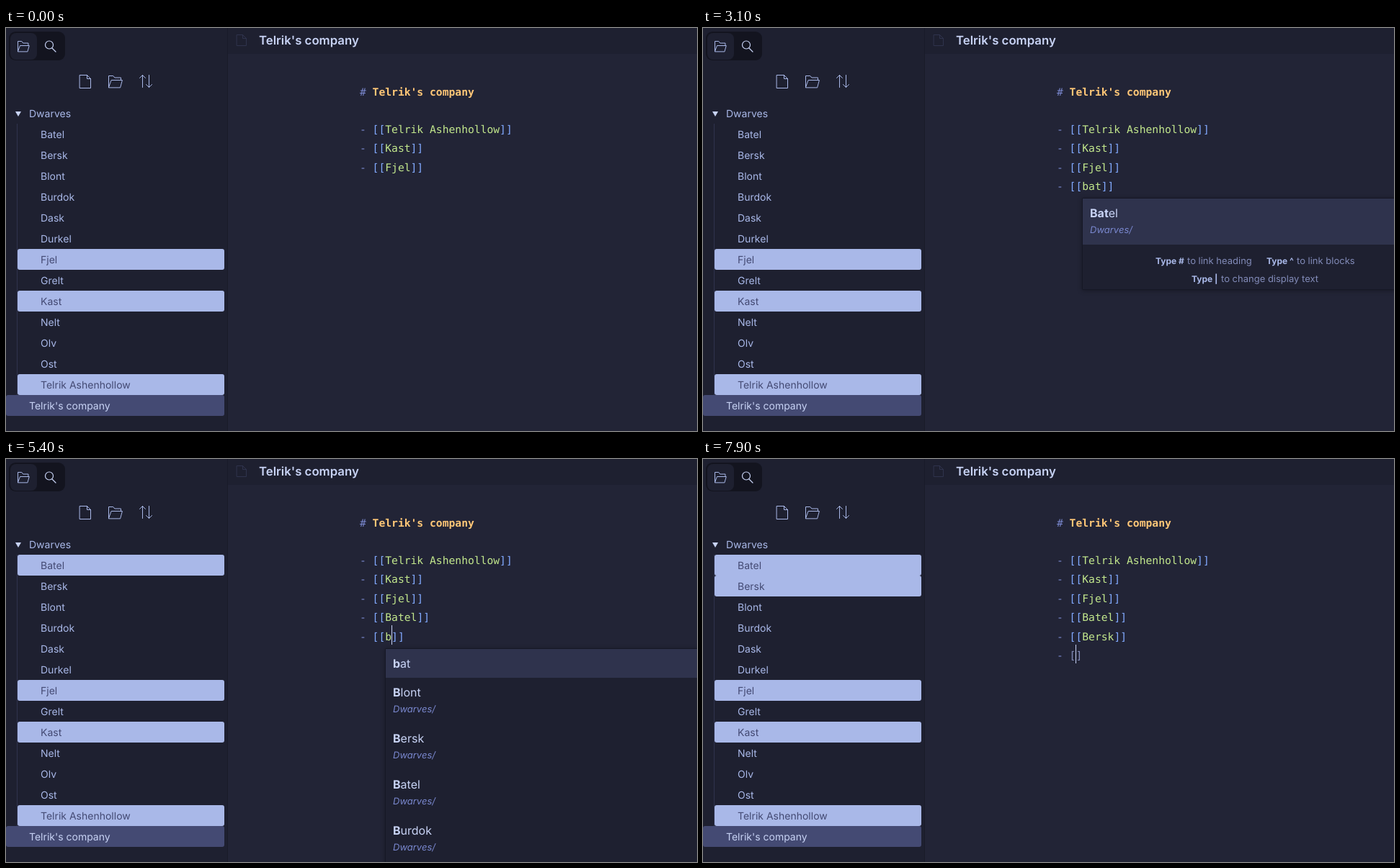
Animation, 959 px wide and 560 px high, one loop 8 s. Source, as an HTML page:

```html
<!DOCTYPE html>
<html lang="en">
<head>
<meta charset="utf-8">
<title>Linking notes</title>
<style>
  html, body { margin: 0; width: 100%; height: 100%; overflow: hidden; background: #222436; }
  svg { display: block; }
  text { white-space: pre; font: 14px Inter, sans-serif; fill: #a9b8e8; text-rendering: geometricPrecision; }
  .title { font-size: 16.8px; font-weight: 600; fill: #c8d3f5; }
  .on { fill: #444a73; }
  .active { fill: #c8d3f5; }
  .code { font: 14.667px "DejaVu Sans Mono", monospace; fill: #828bb8; }
  .mark { fill: #7a88cf; }
  .head { fill: #ffc777; font-weight: 700; }
  .bracket { fill: #82aaff; }
  .link { fill: #c3e88d; }
  .item { font-size: 16px; fill: #c8d3f5; }
  .item .hit { font-weight: 700; }
  .path { font-size: 13px; font-style: italic; fill: #7a88cf; }
  .hint { font-size: 13px; fill: #828bb8; }
  .key { font-size: 12px; font-weight: 700; fill: #a9b8e8; }
  .icon { fill: none; stroke: #a9b8e8; stroke-width: 1; stroke-linejoin: round; stroke-linecap: round; }
  .lens { stroke: #c8d3f5; stroke-width: 1.2; }
  .faint { stroke: #2f334d; }
  .panel { filter: drop-shadow(0 1px 3px #0005); }
</style>
</head>
<body>
<svg id="stage" width="959" height="560" viewBox="0 0 959 560"></svg>
<script>
const LOOP = 8000;
const LEADER = "Telrik Ashenhollow", TITLE = "Telrik's company";
const FOLDER = ["Batel", "Bersk", "Blont", "Burdok", "Dask", "Durkel", "Fjel",
  "Grelt", "Kast", "Nelt", "Olv", "Ost", LEADER];
const LINKS = [LEADER, "Kast", "Fjel", "Batel", "Bersk"];
const RECENT = [TITLE, "Kast", "Fjel", LEADER, "Burdok", "Blont"];
const MATCHES = ["Blont", "Bersk", "Batel", "Burdok"];

// time, list row being edited, its text with | as the caret, popup query
const STEPS = [
  [0, 2, "- [[Fjel]]"], [500, 2, "- [[Fjel]]|"],
  [600, 3, "- |"], [1000, 3, "- [|]"], [1300, 3, "- [[|]]"],
  [1400, 3, "- [[|]]", ""], [1900, 3, "- [[]]", ""],
  [2100, 3, "- [[b|]]", "b"], [2200, 3, "- [[ba|]]", "b"],
  [2300, 3, "- [[ba|]]", "ba"], [2600, 3, "- [[bat|]]", "bat"],
  [3100, 3, "- [[bat]]", "bat"], [3200, 3, "- [[Batel]]|"], [3800, 3, "- [[Batel]]"],
  [4100, 4, "- |"], [4600, 4, "- "], [4700, 4, "- [|]"], [4900, 4, "- [[|]]", ""],
  [5300, 4, "- [[b|]]", "b"], [5700, 4, "- [[be|]]", "b"], [5800, 4, "- [[be|]]", "be"],
  [6200, 4, "- [[be]]", "be"], [6600, 4, "- [[Bersk]]|"], [7100, 4, "- [[Bersk]]"],
  [7400, 5, "- |"], [7900, 5, "- [|]"]
];
const LINKED_AT = { Batel: 5400, Bersk: 7500 };

const X0 = 490.95, CHAR = 8.83, LINE = 26.4;
const lineTop = row => Math.round(125.6 + LINE * row);

const rect = (x, y, w, h, fill, r = 0, cls = "") =>
  `<rect x="${x}" y="${y}" width="${w}" height="${h}" rx="${r}" fill="${fill}" class="${cls}"/>`;
const text = (x, y, cls, s) => `<text x="${x}" y="${y}" class="${cls}">${s}</text>`;
const span = (cls, s) => `<tspan class="${cls}">${s}</tspan>`;
const icon = (d, cls = "") => `<path class="icon ${cls}" d="${d}"/>`;

const page = (x, y, w, h, cls) =>
  icon(`M${x} ${y}h${w - 5}l5 5v${h - 5}h${-w}zM${x + w - 5} ${y}v5h5`, cls);
const folder = (x, y, w, h) =>
  icon(`M${x} ${y + h}V${y}h${w * .35}l2 2.5h${w * .48}v3.5M${x} ${y + h}l${w * .2} ${6 - h}h${w * .85}l${-w * .15} ${h - 6}z`);

function frameArt() {
  return rect(0, 0, 307, 560, "#1e2030") + rect(307, 0, 1, 560, "#191b29") +
    rect(308, 0, 651, 36, "#1e2030") +
    rect(4, 5, 78, 40, "#13141f", 9) + rect(6, 7, 37, 37, "#1e2030", 8) +
    folder(16.5, 18.5, 15, 14) +
    icon("M64 28L69 33M65.5 23.5a5.5 5.5 0 1 1-11 0a5.5 5.5 0 1 1 11 0", "lens") +
    page(102.5, 65.5, 15, 18) + folder(142.5, 66.5, 18, 16) +
    icon("M189.5 82.5v-17l-4 4M189.5 65.5l4 4M198.5 65.5v17l-4-4M198.5 82.5l4-4") +
    page(320.5, 9.5, 13, 15, "faint") +
    text(351, 23, "title", TITLE) +
    '<path d="M13 116h8l-4 7z" fill="#c8d3f5"/>' + text(32, 124, "", "Dwarves");
}

function sidebar(time) {
  const rows = FOLDER.map((name, i) => {
    const y = 133 + 29 * i;
    const on = LINKS.includes(name) && time >= (LINKED_AT[name] || 0);
    return (on ? rect(16, y, 287, 29, "#a9b8e8", 3) : "") + text(48, y + 20, on ? "on" : "", name);
  });
  return rect(15, 133, 1, 377, "#2f334d") + rows.join("") +
    rect(0, 510, 303, 29, "#444a73", 3) + text(32, 530, "active", TITLE);
}

function codeLine(row, line) {
  const s = line.replace("|", "")
    .replace(/\[\[(.*)\]\]/, (_, name) => span("bracket", "[[") + span("link", name) + span("bracket", "]]"))
    .replace(/^-/, span("mark", "-"));
  return text(X0, Math.round(146 + LINE * row), "code", s);
}

function editor(row, line) {
  let out = text(X0, 94, "code", span("mark", "# ") + span("head", TITLE));
  for (let i = 0; i < row; i++) out += codeLine(i, `- [[${LINKS[i]}]]`);
  out += codeLine(row, line);
  const caret = line.indexOf("|"), top = lineTop(row);
  if (caret >= 0) out += rect(Math.floor(X0 + CHAR * caret), top, 1, lineTop(row + 1) - top, "#c8d3f5");
  return out;
}

// Marks the query letters in order; null when the name does not contain them
function fuzzy(name, query) {
  let n = 0;
  const s = [...name].map(c => c.toLowerCase() === query[n] ? (n++, span("hit", c)) : c).join("");
  return n === query.length ? s : null;
}

function popup(row, query) {
  const pool = query ? [...(row > 3 ? ["bat"] : []), ...MATCHES] : RECENT;
  const top = lineTop(row + 1) + 6;
  let y = top, items = "";
  for (const name of pool) {
    const label = fuzzy(name, query);
    if (label === null) continue;
    const inFolder = FOLDER.includes(name), h = inFolder ? 64 : 40;
    if (query && y === top) items += rect(527, y, 478, h, "#2f334d");
    items += text(537, y + 26, "item", label);
    if (inFolder) items += text(537, y + 48, "path", "Dwarves/");
    y += h;
  }
  const hint = (x, x2, dy, key, s) => text(x, y + dy, "key", "Type " + key) + text(x2, y + dy, "hint", s);
  if (query) {
    items += hint(628, 672, 27, "#", "to link heading") + hint(782, 824, 27, "^", "to link blocks") +
      hint(678, 719, 52, "|", "to change display text");
    y += 62;
  }
  return rect(526, top - 1, 480, y - top + 2, "#161825", 2, "panel") +
    rect(527, top, 478, y - top, "#1e2030") + items;
}

const stage = document.getElementById("stage"), base = frameArt();
let shown = "";
function draw() {
  const time = performance.now() % LOOP;
  const [, row, line, query] = STEPS.findLast(s => s[0] <= time);
  const art = base + sidebar(time) + editor(row, line) + (query === undefined ? "" : popup(row, query));
  if (art !== shown) stage.innerHTML = shown = art;
  requestAnimationFrame(draw);
}
draw();
</script>
</body>
</html>
```
